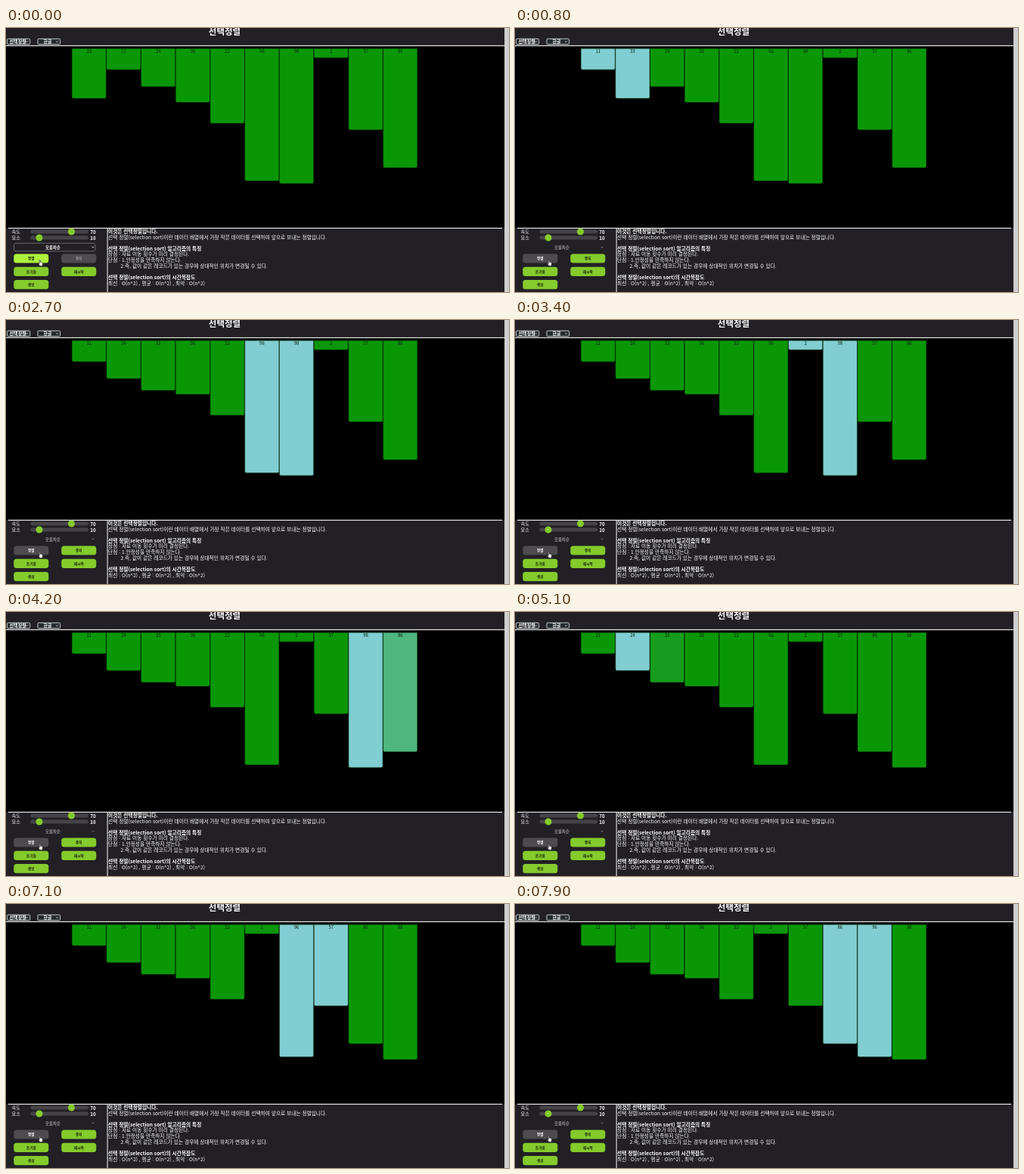
Recreate the animation shown at these times as an HTML page. Size 665 by 350 pixels, loop 8 s.

```html
<!DOCTYPE html>
<html lang="ko">
<head>
<meta charset="utf-8">
<title>선택정렬</title>
<style>
  html, body { margin: 0; width: 100%; height: 100%; overflow: hidden; background: #000; }
  svg { display: block; width: 665px; height: 350px; }
  text { font-family: "Noto Sans CJK KR", "Noto Sans CJK", sans-serif; font-size: 6.7px; fill: #fff; white-space: pre; }
  .bold { font-weight: 700; }
  .mid { text-anchor: middle; }
</style>
</head>
<body>
<svg id="stage" viewBox="0 0 665 350"></svg>
<script>
const LOOP = 8000, FADE = 100;
const VALUES = [33, 11, 24, 36, 52, 96, 98, 2, 57, 86];
const GREEN = [10, 151, 6], CYAN = [128, 206, 210];
const LIME = [132, 203, 44], HOVER = [173, 240, 58], GREY = [77, 75, 78];
const PANEL = '#222024';
const stage = document.getElementById('stage');

function add(tag, attrs, content) {
  const el = document.createElementNS('http://www.w3.org/2000/svg', tag);
  for (const key in attrs) el.setAttribute(key, attrs[key]);
  if (content !== undefined) el.textContent = content;
  return stage.appendChild(el);
}
const rect = (x, y, width, height, fill, more) => add('rect', { x, y, width, height, fill, ...more });
const text = (x, y, content, more) => add('text', { x, y, ...more }, content);
const chevron = (x, y) => add('path', {
  d: `M${x - 1.5} ${y - 0.8}l1.5 1.5 1.5-1.5`, fill: 'none', stroke: '#fff', 'stroke-width': 0.8
});
const clamp = v => Math.max(0, Math.min(1, v));
const mix = (a, b, p) => `rgb(${a.map((v, i) => Math.round(v + (b[i] - v) * p))})`;

// Header
rect(0, 0, 659, 23, PANEL);
rect(0, 22.9, 659, 1.2, '#e6e6e6');
text(289, 8.6, '선택정렬', { class: 'bold mid', style: 'font-size:11.5px' });
function topSelect(x, width, label, labelX) {
  rect(x, 14.3, width, 7.3, '#262a2c', { rx: 1.2, stroke: '#d5dcda', 'stroke-width': 0.9 });
  text(labelX, 20.2, label, { class: 'bold', style: 'font-size:6px' });
  chevron(x + width - 4, 18);
}
topSelect(1.4, 30.3, '선택정렬', 4.6);
topSelect(42, 29.6, '한글', 49.5);

// Lower panel
rect(0, 265, 659, 85, PANEL);
rect(3, 264.8, 653, 1.2, '#e6e6e6');
rect(133.6, 265, 1.1, 85, '#e6e6e6');
rect(659, 0, 6, 350, '#cfcfcf');

function slider(y, label, value, thumbX) {
  text(7.5, y + 2.3, label, { style: 'font-size:6.2px' });
  rect(32.5, y - 2.4, 76.5, 4.8, '#454347', { rx: 2.2 });
  add('circle', { cx: thumbX, cy: y, r: 4.5, fill: mix(LIME, LIME, 0) });
  text(111.3, y + 2.6, value, { class: 'bold', style: 'font-size:6.2px' });
}
slider(270, '속도', '70', 86.5);
slider(278, '요소', '10', 44);

const orderBox = rect(10.5, 285.3, 107.5, 10.6, 'none', { rx: 2.5, stroke: '#77757a', 'stroke-width': 0.8 });
const orderText = text(62, 292.6, '오름차순', { class: 'bold mid', style: 'font-size:5.4px' });
const orderArrow = chevron(115, 290.5);

function button(x, y, label) {
  const box = rect(x, y, 46, 12.2, mix(LIME, LIME, 0), { rx: 3.5 });
  const caption = text(x + 23, y + 7.9, label, { class: 'bold mid', style: 'font-size:4.7px;fill:#16200a' });
  return { box, caption };
}
const sortButton = button(10.3, 299.4, '정렬');
const stopButton = button(73.3, 299.4, '중지');
button(10.3, 316.8, '초기화');
button(73.3, 316.8, '재시작');
button(10.3, 334, '생성');

[
  [135, 271.9, '이것은 선택정렬입니다.', 1],
  [135, 279.5, '선택 정렬(selection sort)이란 데이터 배열에서 가장 작은 데이터를 선택하여 앞으로 보내는 정렬입니다.'],
  [135, 294.9, '선택 정렬(selection sort) 알고리즘의 특징', 1],
  [135, 302.4, '장점 : 자료 이동 횟수가 미리 결정된다.'],
  [135, 310, '단점 : 1.안정성을 만족하지 않는다.'],
  [151.5, 317.6, '2.즉, 값이 같은 레코드가 있는 경우에 상대적인 위치가 변경될 수 있다.'],
  [135, 332.9, '선택 정렬(selection sort)의 시간복잡도', 1],
  [135, 340.5, '최선 : O(n^2) , 평균 : O(n^2) , 최악 : O(n^2)']
].forEach(([x, y, line, bold]) => text(x, y, line, { class: bold ? 'bold' : '' }));

// Hand pointer
add('path', {
  d: 'M44.2 307.6q.9-.5 1.3.5v2.2l2.2.5q1 .3.9 1.4l-.6 3.2h-3.2l-2.1-3q.2-.8 1.5.1z',
  fill: '#fff', stroke: '#111', 'stroke-width': 0.6
});

// Bars
const bars = VALUES.map((_, i) => {
  const x = 87.2 + 45.72 * i;
  return {
    x,
    shape: add('path', { stroke: '#06360a', 'stroke-width': 0.5 }),
    label: text(x + 22.6, 33.2, '', { class: 'mid', style: 'font-size:6px;fill:#04200a' })
  };
});
function barPath(x, value) {
  const h = 8.9 + 1.735 * value;
  return `M${x} 27.2h45.1v${h - 2}q0 2-2 2h-41.1q-2 0-2-2z`;
}

// Every comparison and every exchange of adjacent bars takes one beat
function sortSteps(values) {
  const list = values.slice(), steps = [];
  for (let end = list.length - 1; end > 0; end--) {
    for (let i = 0; i < end; i++) {
      steps.push({ pair: i, list: list.slice(), compare: true });
      if (list[i] > list[i + 1]) {
        [list[i], list[i + 1]] = [list[i + 1], list[i]];
        steps.push({ pair: i, list: list.slice() });
      }
    }
  }
  return steps;
}
const beatTime = k => 450 + 305 * k + 10.8 * Math.max(0, Math.min(6, k - 9));
const steps = sortSteps(VALUES).map((step, k) => ({ ...step, time: beatTime(k) }));
const inPair = (step, i) => !!step && (i === step.pair || i === step.pair + 1);

function render(t) {
  const next = steps.findIndex(step => step.time > t);
  const step = steps[next - 1], previous = steps[next - 2];
  const list = step ? step.list : VALUES;
  bars.forEach((bar, i) => {
    let glow = 0;
    if (inPair(step, i)) {
      glow = step.compare && !inPair(previous, i) ? clamp((t - step.time) / FADE) : 1;
    }
    bar.shape.setAttribute('d', barPath(bar.x, list[i]));
    bar.shape.setAttribute('fill', mix(GREEN, CYAN, glow));
    bar.label.textContent = list[i];
  });

  const run = clamp((t - steps[0].time) / FADE), running = run > 0;
  sortButton.box.setAttribute('fill', mix(HOVER, GREY, run));
  sortButton.caption.style.fill = running ? '#fff' : '#16200a';
  stopButton.box.setAttribute('fill', mix(GREY, LIME, run));
  stopButton.caption.style.fill = running ? '#16200a' : '#a09ea2';
  orderBox.setAttribute('opacity', running ? 0 : 1);
  orderText.style.fill = running ? '#9a989c' : '#fff';
  orderArrow.setAttribute('opacity', running ? 0.45 : 1);
}

const start = performance.now();
function tick() {
  render((performance.now() - start) % LOOP);
  requestAnimationFrame(tick);
}
tick();
</script>
</body>
</html>
```
